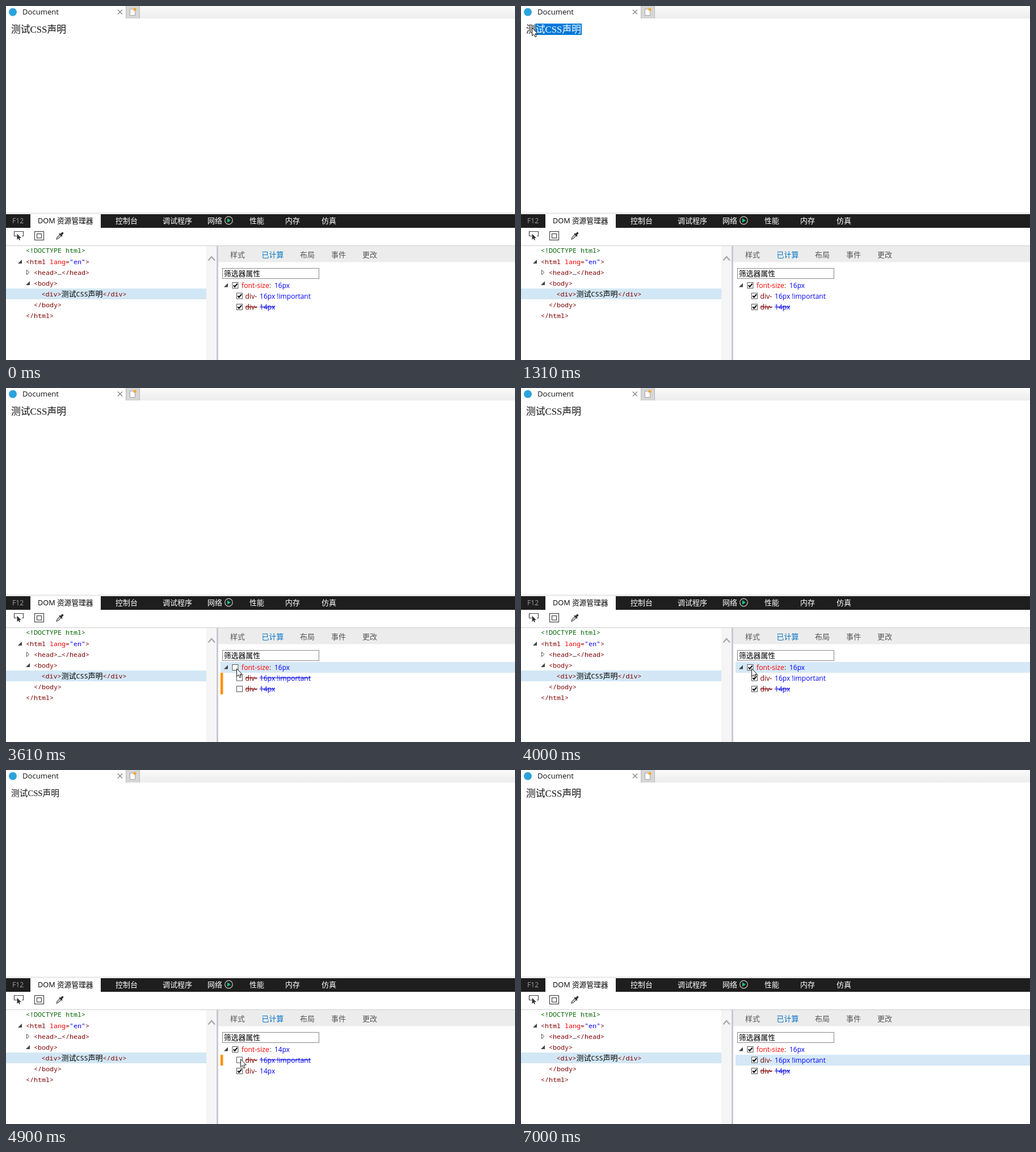
Write an HTML page that moves like this. It is 897 px wide and 624 px high and loops after 8 s.

```html
<!DOCTYPE html>
<html lang="zh-CN">
<head>
<meta charset="utf-8">
<title>Document</title>
<style>
html, body { margin: 0; width: 100%; height: 100%; overflow: hidden; background: #fff; }
svg { display: block; width: 897px; height: 624px; }
text { white-space: pre; }
.ui { font: 13px "Open Sans", "Noto Sans CJK SC", "Noto Sans CJK", sans-serif; }
.mono { font: 11.67px "Noto Sans Mono", "Noto Sans CJK SC", "Noto Sans CJK", monospace; }
.page { font: 300 16.8px "Liberation Serif", "Noto Sans CJK SC", "Noto Sans CJK", serif; }
</style>
</head>
<body>
<svg id="stage" viewBox="0 0 897 624" xmlns="http://www.w3.org/2000/svg">
  <defs>
    <linearGradient id="strip" x2="0" y2="1">
      <stop offset="0" stop-color="#fafafa"/><stop offset="1" stop-color="#ededed"/>
    </linearGradient>
    <clipPath id="selClip"><rect id="selArea" y="31" height="20"/></clipPath>
  </defs>
  <rect width="897" height="624" fill="#fff"/>
  <g id="browser"></g>
  <g id="tools"></g>
  <g id="tree"></g>
  <g id="styles"></g>
  <path id="cursor" d="M.6 .7V14.6L3.7 11.7L6 16.7L8.2 15.7L6 10.9H10.4Z" fill="#fff" stroke="#111"/>
</svg>
<script>
const LOOP = 8000;
const $ = id => document.getElementById(id);
const rect = (x, y, w, h, fill, more = '') =>
  `<rect x="${x}" y="${y}" width="${w}" height="${h}" fill="${fill}" ${more}/>`;
const line = (d, color, w = 1, more = '') =>
  `<path d="${d}" fill="none" stroke="${color}" stroke-width="${w}" ${more}/>`;
const text = (x, y, s, fill = '#000', cls = 'ui', size = 0, more = '') =>
  `<text x="${x}" y="${y}" class="${cls}" fill="${fill}" ${size ? `style="font-size:${size}px"` : ''} ${more}>${s}</text>`;
const esc = s => s.replace(/</g, '&lt;').replace(/>/g, '&gt;');
const span = (s, fill) => `<tspan fill="${fill}">${esc(s)}</tspan>`;
const tag = s => span(s, '#800000');

const WORDS = '测试CSS声明';

// Browser tab strip and page
$('browser').innerHTML =
  rect(0, 0, 897, 22, 'url(#strip)') +
  rect(0, 0, 211, 22, '#fff') +
  rect(211, 0, 25, 22, '#d6d6d6') +
  line('M211.5 0V22M235.5 0V22', '#bcbcbc') +
  '<circle cx="12" cy="10.7" r="7" fill="#2ba3dc"/>' +
  text(29, 15, 'Document', '#111', 'ui', 13.1) +
  line('M197 6.5L205 14.5M205 6.5L197 14.5', '#8a8a8a', 1.5) +
  rect(218.5, 5.5, 9, 11, '#fff', 'stroke="#a5a5a5"') +
  '<circle cx="227" cy="6" r="2.6" fill="#f6a62a"/>' +
  '<g id="words"></g>' +
  `<g clip-path="url(#selClip)">${rect(0, 31, 140, 20, '#0078d7')}${text(9, 47, WORDS, '#fff', 'page')}</g>`;

// Tool bar
const tabs = [[193, '控制台'], [276, '调试程序'], [355, '网络'], [429, '性能'], [492, '内存'], [556, '仿真']];
$('tools').innerHTML =
  rect(0, 364, 897, 3, '#ececec') +
  rect(0, 367, 897, 24, '#1e1e1e') +
  '<rect id="hover" x="346" y="367" width="64" height="24" fill="#363636"/>' +
  rect(43, 367, 124, 24, '#fff') +
  text(11, 383, 'F12', '#a0a0a0', 'ui', 12.2) +
  text(56, 383, 'DOM 资源管理器', '#000', 'ui', 12.7) +
  tabs.map(([x, s]) => text(x, 382.7, s, '#fff')).join('') +
  '<circle cx="392.5" cy="378" r="6.8" fill="#1e1e1e" stroke="#c8c8c8" stroke-width="1.2"/>' +
  '<path d="M390 374.3V381.7L396 378Z" fill="#10c878"/>' +
  line('M19 405.5H14.5V397.5H30.5V405.5H28', '#444', 1.2) +
  '<path d="M19.5 401.5V412L22 409.7L23.4 413L25 412.3L23.6 409H27Z" fill="#333"/>' +
  rect(50.5, 397.5, 16, 15, 'none', 'stroke="#444" stroke-width="1.2"') +
  rect(54.5, 401.5, 8, 7.5, 'none', 'stroke="#444" stroke-width="1.2"') +
  line('M95.5 402.5L90 408L89 411L92 410L97.5 404.5', '#444', 1.2) +
  line('M94 401L99 406', '#333', 1.8) +
  line('M97 403L99.5 400.5', '#333', 3.6, 'stroke-linecap="round"') +
  line('M0 422.5H897', '#cfcfcf');

// Element tree
const OPEN = x => y => `<path d="M${x} ${y}h-7l7 -7Z" fill="#444"/>`;
const rows = [
  [35, 435, span('<!DOCTYPE html>', '#006400')],
  [35, 454.5, tag('<html ') + span('lang', '#f00') + span('=', '#800000') + span('"en"', '#00f') + tag('>')],
  [49, 473.5, tag('<head>') + span('…', '#000') + tag('</head>')],
  [49, 493, tag('<body>')],
  [62.5, 511.5, tag('<div>') + `<tspan fill="#000"><tspan style="font-size:13px">测试</tspan>CSS<tspan style="font-size:13px">声明</tspan></tspan>` + tag('</div>')],
  [49, 531, tag('</body>')],
  [35, 550, tag('</html>')]
];
$('tree').innerHTML =
  rect(0, 498, 353, 19, '#d2e7f5') +
  rect(353, 423, 18, 201, '#f5f5f5') +
  line('M356.5 448.5L362.3 442L368 448.5', '#a9a9a9', 2.4) +
  rect(371, 423, 3, 201, '#c9c9d4') +
  OPEN(28)(454) + OPEN(42)(492) +
  line('M36.5 465.5V473.5L41 469.5Z', '#555') +
  rows.map(([x, y, s]) => text(x, y, s, '#000', 'mono')).join('');

// Computed styles
const heads = [[395, '样式'], [518, '布局'], [573, '事件'], [628, '更改']];
const box = (x, y, id) =>
  rect(x + .5, y + .5, 10, 10, '#fff', 'stroke="#555"') +
  line(`M${x + 2.4} ${y + 5.4}L${x + 4.6} ${y + 8}L${x + 9} ${y + 2.6}`, '#000', 2, `id="${id}"`);
const entry = (y, n, value, end) =>
  box(406, y - 10, 'tick' + n) +
  text(421.5, y, 'div-', '#800000', 'ui', 12.3) +
  text(447, y, value, '#00f', 'ui', 12.05) +
  `<g id="strike${n}">${line(`M422 ${y - 4.5}H443`, '#800000', 1.1)}${line(`M447 ${y - 4.5}H${end}`, '#0000c8', 1.1)}</g>`;
$('styles').innerHTML =
  rect(374, 423, 523, 28.5, '#ececec') +
  heads.map(([x, s]) => text(x, 442.7, s, '#555')).join('') +
  text(450.5, 442.7, '已计算', '#0072c6', 'ui', 13, 'font-weight="700" style="font-weight:700"') +
  rect(381.5, 462.5, 170, 18, '#fff', 'stroke="#8a8a8a"') +
  text(384, 476.3, '筛选器属性', '#000', 'ui', 12.8) +
  rect(378, 483, 519, 19, '#d5e8f6', 'id="lit1"') +
  rect(378, 502, 519, 19, '#d5e8f6', 'id="lit2"') +
  rect(378, 502, 4.5, 38, '#ff9000', 'id="bar"') +
  OPEN(391)(495.5) +
  box(398.5, 487, 'tick1') +
  text(415, 497, 'font-size<tspan fill="#333">:</tspan>', '#f00', 'ui', 12.25) +
  text(473, 497, '16px', '#00f', 'ui', 12, 'id="size"') +
  entry(515.5, 2, '16px !important', 537) +
  entry(535, 3, '14px', 474);

// Pointer runs: first step, last step, number of steps, end point, ease-out power
const runs = [
  [130, 130, 1, 686, 577, 1],
  [200, 270, 2, 396, 383, 1],
  [410, 850, 7, 119, 39, 1.3],
  [1010, 1450, 7, 2, 38, 1.54],
  [1610, 2192, 9, 411, 484, 1.2],
  [2265, 2410, 3, 397, 501, 1],
  [2490, 2560, 2, 468, 511, 1],
  [2630, 2770, 3, 404, 488, 1],
  [2930, 2930, 1, 405, 493, 1],
  [3610, 3610, 1, 406, 494, 1],
  [4230, 4300, 2, 428, 506, 1],
  [4370, 4510, 3, 413, 509, 1.3],
  [5720, 5800, 2, 441, 505, 1],
  [5940, 6020, 2, 437, 497, 1],
  [6560, 6930, 6, 832, 324, 1]
];

function pointer(t) {
  let x = 686, y = 577;
  for (const [a, b, n, ex, ey, pow] of runs) {
    if (t < a) break;
    const gap = n > 1 ? (b - a) / (n - 1) : 1;
    const step = Math.min(n, Math.floor((t - a) / gap + 1.01));
    const k = 1 - (1 - step / n) ** pow;
    x += (ex - x) * k;
    y += (ey - y) * k;
  }
  return [Math.round(x), Math.round(y)];
}

const edges = [9, 25.3, 42.6, 53.8, 63.1, 72.5, 89.3, 107];
const nearest = x => edges.reduce((a, b) => Math.abs(b - x) < Math.abs(a - x) ? b : a);
const show = (id, on) => $(id).setAttribute('visibility', on ? 'visible' : 'hidden');
let pageSize = 0;

function draw(t) {
  const within = (a, b) => t >= a && t < b;
  const [x, y] = pointer(t);
  $('cursor').setAttribute('transform', `translate(${x} ${y})`);
  show('cursor', within(130, 7000));
  show('hover', within(270, 410));

  const left = within(1010, 1610) ? nearest(x) : 107;
  $('selArea').setAttribute('x', left);
  $('selArea').setAttribute('width', 107 - left);

  const allOff = within(3150, 4000);
  const small = within(4900, 5580);
  const size = small ? 14 : 16;
  if (size !== pageSize) {
    pageSize = size;
    $('words').innerHTML = text(9, small ? 45.5 : 47, WORDS, '#111', 'page', size * 1.05);
    $('size').textContent = size + 'px';
  }
  show('tick1', !within(3150, 3920));
  show('tick2', !allOff && !within(4820, 5580));
  show('tick3', !allOff);
  show('strike2', allOff || small);
  show('strike3', !small);
  show('lit1', within(3150, 4740));
  show('lit2', within(4740, 4900) || t >= 5440);
  show('bar', allOff || small);
  $('bar').setAttribute('height', small ? 19 : 38);
}

const start = performance.now();
function tick() {
  draw((performance.now() - start) % LOOP);
  requestAnimationFrame(tick);
}
tick();
</script>
</body>
</html>
```
